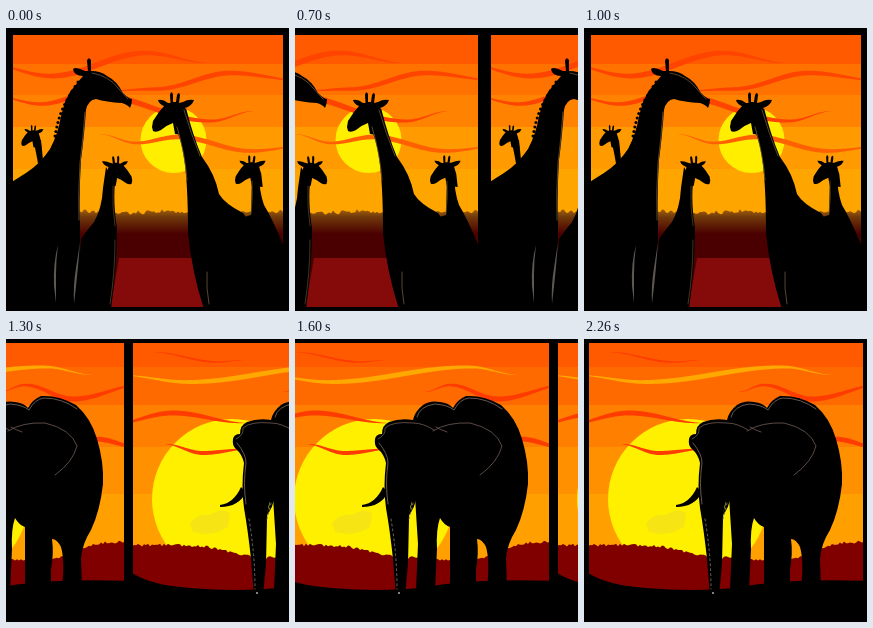
Animation, 283 px wide and 283 px high, one loop 2.5 s. Source, as an HTML page with a canvas:

```html
<!DOCTYPE html>
<html>
<head>
<meta charset="utf-8">
<style>
  html, body { margin: 0; height: 100%; overflow: hidden; background: #000; }
  canvas { display: block; }
</style>
</head>
<body>
<canvas id="stage" width="283" height="283"></canvas>
<script>
const SIZE = 283, LOOP = 2500;
const screen2d = document.getElementById('stage').getContext('2d');
let g;

const fill = (color, d) => { g.fillStyle = color; g.fill(new Path2D(d)); };

function line(color, width, d) {
  g.strokeStyle = color;
  g.lineWidth = width;
  g.stroke(new Path2D(d));
}

function disc(color, x, y, r) {
  g.fillStyle = color;
  g.beginPath();
  g.arc(x, y, r, 0, 7);
  g.fill();
}

// Flat colour bands, each running from its top edge to the bottom.
function sky(bands) {
  for (const [y, color] of bands) {
    g.fillStyle = color;
    g.fillRect(0, y, SIZE, SIZE - y);
  }
}

// Tapered cloud that waves between the given crests and troughs.
function wisp(color, thick, ...knots) {
  const upper = [], lower = [];
  const left = knots[0][0], right = knots.at(-1)[0];
  for (let x = left; x <= right; x++) {
    const i = Math.max(1, knots.findIndex(k => x <= k[0]));
    const [[x0, y0], [x1, y1]] = [knots[i - 1], knots[i]];
    const y = y0 + (y1 - y0) * (1 - Math.cos(Math.PI * (x - x0) / (x1 - x0))) / 2;
    const half = thick / 2 * Math.sin(Math.PI * (x - left) / (right - left));
    upper.push(`${x} ${y - half}`);
    lower.unshift(`${x} ${y + half}`);
  }
  fill(color, `M${upper.concat(lower).join('L')}Z`);
}

// Ragged treeline following height(x).
function treeline(color, rough, height) {
  let d = `M0 ${SIZE}`;
  for (let x = 0; x <= SIZE; x += 2) {
    const noise = Math.sin(x * x * 12.9898 + x) * 43758.5453;
    d += `L${x} ${height(x) + (noise - Math.floor(noise) - .5) * rough}`;
  }
  fill(color, d + `L${SIZE} ${SIZE}Z`);
}

// Giraffe head looking left; a negative sx mirrors it.
function head(x, y, sx) {
  g.save();
  g.translate(x, y);
  g.scale(sx, Math.abs(sx));
  fill('#000', 'M-24 15L-23 9-17 0-12-6Q-17-8-18-12Q-13-13-8-9L-5.5-9-6-17Q-5-22-3-18' +
    'L-3-10 0-10 1-17Q3-21 4-17L3-9 7-10Q12-13 18-12Q16-6 9-4L12 6 14 24-1 22' +
    'L-3 11Q-9 13-15 18Q-20 21-23 19Z');
  g.restore();
}

function giraffes() {
  sky([[0, '#ff5a00'], [36, '#ff7200'], [67, '#ff8200'], [99, '#ff9b00'], [141, '#ffa500']]);
  disc('#ffee00', 167.5, 112, 33);

  const red = '#ff4400';
  wisp(red, 6, [-20, 36], [45, 48], [140, 25], [203, 35]);
  wisp(red, 5, [100, 63], [150, 61], [225, 45], [300, 53]);
  wisp(red, 6, [-20, 66], [35, 76], [85, 66], [205, 93], [249, 83]);
  wisp('#ff6000', 5, [93, 106], [130, 115], [172, 109], [245, 123], [300, 118]);

  const dust = g.createLinearGradient(0, 180, 0, 206);
  dust.addColorStop(0, '#a8680c');
  dust.addColorStop(.35, '#70380a');
  dust.addColorStop(1, '#4a0000');
  treeline(dust, 4, x => 184 + Math.sin(x / 15));
  fill('#850b0b', 'M113 230H187L199 281H104Z');

  // Far left
  head(28, 107.5, .53);
  fill('#000', 'M27 112L35 112 38 142 33 142Q30 122 27 112Z');

  // Large one on the left
  fill('#000', 'M0 281V158Q7 153 20 145Q34 136 44 121Q52 106 55 88L59 74 64 64 72 54 77 48' +
    'Q68 48 67 41Q69 38 79 43L82 43 81 33Q82 28 85 32L85 43Q95 43 101 48Q111 53 117 65' +
    'Q123 71 126 71Q126 76 124 80Q122 77 116 75Q100 74 90 71Q82 72 80 82' +
    'Q78 110 75 132Q73 165 74 195L74 281Z');
  for (let i = 0; i < 13; i++) {
    const t = i / 12;
    disc('#000', 72 - 23 * t - 4 * Math.sin(t * Math.PI), 54 + 54 * t, 1.5);
  }
  line('#7c6244', .7, 'M86 45Q103 48 112 60L122 71M79 84Q77 112 74 135Q72 165 73 192');

  // Centre
  head(109, 142, -.72);
  fill('#000', 'M100 139L109 155Q107 175 111 200Q111 238 105 281H70L75 211Q82 201 88 194' +
    'Q96 180 97 160Z');
  line('#5c4a30', .7, 'M107 158Q106 178 109 198M109 212Q109 245 104 276');

  // Right
  head(246.5, 141.6, .73);
  fill('#000', 'M246 150L253 144Q253 163 258 177Q267 192 278 219V281H210L235 190 245 187Z');
  line('#6c5434', .7, 'M246 153Q247 170 245 186');

  // Tall one right of centre
  head(170, 84, 1);
  fill('#000', 'M168 95L180 80Q187 108 196 129Q209 146 213 166Q219 176 237 185' +
    'L248 200 255 281H198Q186 245 182 205Q182 155 178 130Q175 110 168 95Z');
  line('#7c6644', .7, 'M171 99Q179 125 181 152M178 82Q185 106 194 128M201 244Q200 260 203 276');

  // Light between the legs
  fill('#5e5852', 'M52 217Q47 235 48 258L50 275Q50 260 50 246Q50 232 52 217Z' +
    'M74 214Q72 242 68 276Q67 258 70 240Z');
}

function elephant() {
  sky([[0, '#ff5a00'], [28, '#ff6a00'], [66, '#ff8000'], [108, '#ff9000'], [155, '#ffa000']]);
  disc('#fff000', 104, 160, 80);
  fill('#f6e414', 'M62 185Q68 174 82 176Q94 168 102 174L100 188Q85 198 65 193Z');

  const red = '#ff3c00';
  wisp(red, 2, [23, 13], [90, 23], [118, 21]);
  wisp('#ffa800', 5, [-10, 36], [60, 43], [200, 28], [249, 36]);
  wisp(red, 5, [154, 53], [180, 46], [228, 60], [300, 45]);
  wisp(red, 5, [-20, 86], [45, 74], [118, 84]);
  wisp(red, 4, [36, 105], [75, 114], [120, 110]);
  wisp(red, 5, [222, 108], [250, 100], [300, 110]);

  treeline('#800000', 3, x => x < 160
    ? 206 + 13 / (1 + Math.exp((100 - x) / 12))
    : 203 + 17 / (1 + Math.exp((x - 234) / 8)));
  fill('#000', 'M0 231Q18 246 62 249Q110 253 150 249Q205 239 283 242V283H0Z');

  // Body and hind legs, with arches left open between the legs
  fill('#000', 'M105 100Q106 95 112 95Q112 86 119 83Q130 79 143 81Q145 72 153 66Q160 61 170 63' +
    'Q179 64 183 69Q188 60 196 57Q214 56 231 66Q246 79 252 100Q259 123 258 145' +
    'Q255 172 246 191Q237 205 236 220L237 249H217Q220 222 216 208Q212 200 207 200' +
    'Q209 215 206 230V250H180V188Q174 186 170 179Q166 190 167 210L165 251H146' +
    'L148 205 145 158Q140 162 139 180L138 225 135 257H126L123 220Q120 192 116 169' +
    'Q113 148 116 124Q114 115 108 110Q104 107 105 100Z');

  // Tusks
  fill('#000', 'M92 166Q106 164 113 148L118 153Q111 168 92 168Z' +
    'M136 179Q143 169 143 150L147 152Q146 171 136 179Z');

  line('#5a4a44', 1, 'M108 100Q116 96 115 89Q123 82 143 84Q153 84 164 91' +
    'M163 92Q177 83 200 84Q226 90 232 107Q228 123 210 136M166 88Q171 91 177 93');
  line('#806c64', .8, 'M147 78Q150 67 165 65Q178 66 184 71Q190 60 199 59Q217 59 232 70' +
    'M109 104Q118 115 118 124Q115 145 118 165');
  g.setLineDash([2, 3]);
  line('#77706c', .9, 'M121 180Q127 215 127 250M143 164L139 180');
  g.setLineDash([]);
  disc('#b4aca4', 129, 254, 1);
}

// Paints a scene once, clipped to its picture frame.
function scene(draw, x, y, w, h) {
  const canvas = document.createElement('canvas');
  canvas.width = canvas.height = SIZE;
  g = canvas.getContext('2d');
  g.fillRect(0, 0, SIZE, SIZE);
  g.beginPath();
  g.rect(x, y, w, h);
  g.clip();
  g.lineCap = g.lineJoin = 'round';
  draw();
  return canvas;
}

const savanna = scene(giraffes, 7, 7, 270, 272);
const sunset = scene(elephant, 5, 4, 274, 275);

// [end time, scene, horizontal shift]
const steps = [
  [700, savanna, 0], [1000, savanna, -94], [1300, savanna, 0],
  [1600, sunset, -161], [1900, sunset, -25], [LOOP, sunset, 0]
];

const start = performance.now();
function frame() {
  const t = (performance.now() - start) % LOOP;
  const [, picture, shift] = steps.find(([end]) => t < end);
  screen2d.drawImage(picture, shift, 0);
  screen2d.drawImage(picture, shift + SIZE, 0);
  requestAnimationFrame(frame);
}
frame();
</script>
</body>
</html>
```
